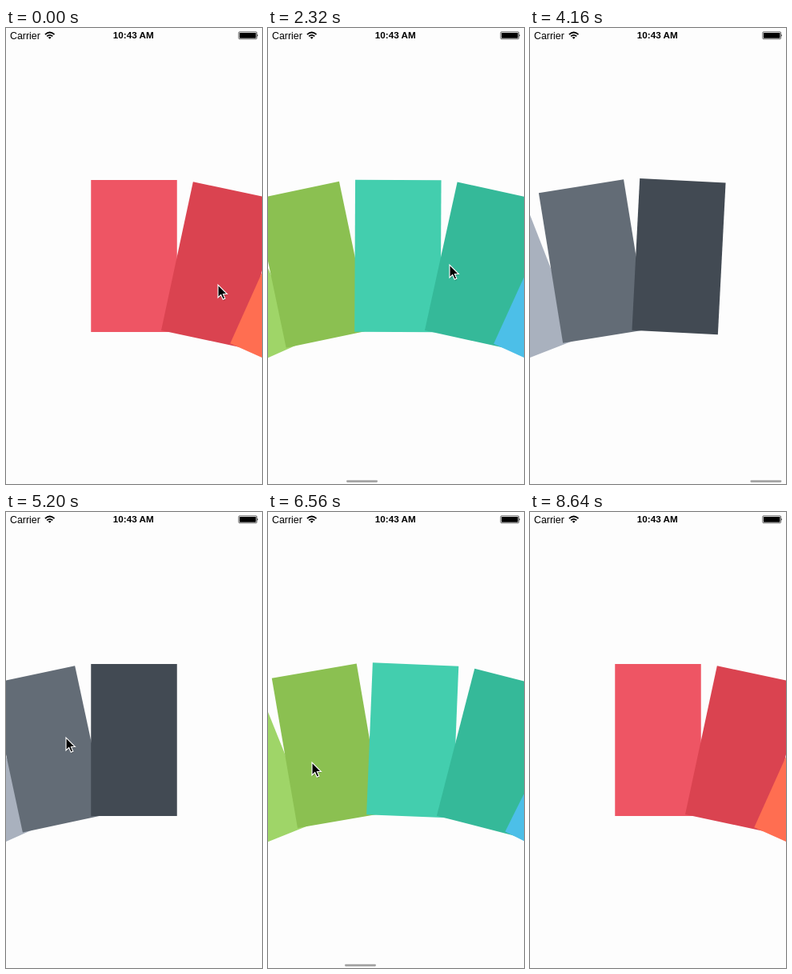
These frames come from a looping animation (320x570 px, 8720 ms). An HTML page:

```html
<!DOCTYPE html>
<html lang="en">
<head>
<meta charset="utf-8">
<title>Card wheel</title>
<style>
  html, body { margin: 0; width: 100%; height: 100%; overflow: hidden; background: #fdfdfd; }
  svg { display: block; width: 320px; height: 570px; }
  text { font-family: "Liberation Sans", Arial, sans-serif; fill: #000; }
</style>
</head>
<body>
<svg viewBox="0 0 320 570">
  <rect width="320" height="570" fill="#fdfdfd"/>
  <g id="wheel"></g>
  <rect id="bar" y="565.3" width="39" height="2.6" rx="1.3" fill="#a4a4a4"/>

  <text x="5" y="13.5" font-size="12.4">Carrier</text>
  <g fill="none" stroke="#000" stroke-width="1.7">
    <path d="M48.9 8.1Q54.7 2.9 60.5 8.1"/>
    <path d="M51.1 10.4Q54.7 7.2 58.3 10.4"/>
  </g>
  <path d="M52.7 11.7Q54.7 10.2 56.7 11.7L54.7 13.7Z"/>
  <text x="159.3" y="13.4" font-size="11.7" font-weight="700" text-anchor="middle">10:43 AM</text>
  <rect x="290.8" y="4.8" width="22.8" height="9" rx="1.3" fill="none" stroke="#000" stroke-width=".6"/>
  <rect x="291.9" y="5.9" width="20.6" height="6.8" rx=".6"/>
  <path d="M314.2 7.8Q315.8 9.3 314.2 10.8Z"/>

  <g id="cursor">
    <path d="M.8 1.6V17.6L4.5 14.1L7 19.8L9.6 18.7L7.2 13.1H12.2Z" fill="#000" opacity=".22"/>
    <path d="M0 0V16L3.7 12.5L6.2 18.2L8.8 17.1L6.4 11.5H11.4Z" fill="#000" stroke="#fff" stroke-width="1.1"/>
  </g>
</svg>
<script>
const LOOP = 8720, STEP = 80;
const CX = 160, CY = 285, RADIUS = 508, ANGLE = 12.1;
const CARD_W = 107.5, CARD_H = 190;
const DRAG = 300, DRAG_MS = 300, REST_MS = 80, FADE_MS = 300;

const COLORS = ("ee5564 da4350 ff6e51 e9573f ffce54 f7b740 9fd568 8bc051 " +
  "43ceae 35b999 4cbfe8 3bafda 5d9cec 4a89dc ab91ec 957adc " +
  "ed85c0 d76dab f5f7fa e6e9ed ccd1d9 a9b1be 636c76 424a53").split(" ");

// Each flick grabs at (x, y) and glides to card `to` in `ms`.
const FLICKS = [
  { start: 80,   ms: 2750, to: 8,  x: 265, y: 321 },
  { start: 2400, ms: 2000, to: 16, x: 227, y: 296 },
  { start: 3600, ms: 900,  to: 23, x: 212, y: 334 },
  { start: 5280, ms: 1000, to: 16, x: 75,  y: 282 },
  { start: 5960, ms: 1200, to: 7,  x: 65,  y: 300 },
  { start: 6640, ms: 800,  to: 0,  x: 55,  y: 313 }
];

const clamp = (v, lo = 0, hi = 1) => Math.min(hi, Math.max(lo, v));
const mix = (a, b, u) => a + (b - a) * u;
const glide = u => 1 - (1 - clamp(u)) ** 3.5;

// A new flick takes over from wherever the last one has got to.
let rest = 0;
for (const flick of FLICKS) {
  const next = FLICKS[FLICKS.indexOf(flick) + 1];
  const heldFor = (next ? next.start : LOOP) - flick.start;
  flick.from = rest;
  rest = mix(flick.from, flick.to, glide(heldFor / flick.ms));
}

function position(flick, time) {
  return mix(flick.from, flick.to, glide((time - flick.start) / flick.ms));
}

// Drag across the stage, then drift back to the next grab point.
function pointer(flick, next, time) {
  const dragEnd = flick.start + DRAG_MS;
  const endX = flick.x + DRAG * Math.sign(flick.from - flick.to);
  if (time < dragEnd || !next) {
    return [mix(flick.x, endX, clamp((time - flick.start) / DRAG_MS)), flick.y];
  }
  const u = clamp((time - dragEnd) / (next.start - REST_MS - dragEnd)) ** 3;
  return [mix(endX, next.x, u), mix(flick.y, next.y, u)];
}

const byId = id => document.getElementById(id);
const wheel = byId("wheel"), bar = byId("bar"), cursor = byId("cursor");

const cards = COLORS.map(color => {
  const card = document.createElementNS("http://www.w3.org/2000/svg", "rect");
  const attrs = {
    x: CX - CARD_W / 2, y: CY - CARD_H / 2,
    width: CARD_W, height: CARD_H, fill: "#" + color
  };
  for (const key in attrs) card.setAttribute(key, attrs[key]);
  return wheel.appendChild(card);
});

function draw(time) {
  const started = FLICKS.filter(f => f.start <= time).length;
  const flick = FLICKS[Math.max(0, started - 1)];
  const next = FLICKS[started];
  const pos = position(flick, time);

  cards.forEach((card, i) => {
    const turn = (i - pos) * ANGLE;
    card.setAttribute("transform", `rotate(${turn} ${CX} ${CY + RADIUS})`);
  });
  bar.setAttribute("x", 2.3 + pos * 12);
  bar.setAttribute("opacity",
    started ? clamp((flick.start + flick.ms + FADE_MS - time) / FADE_MS) : 0);
  cursor.setAttribute("transform", `translate(${pointer(flick, next, time)})`);
}

const start = performance.now();
function tick() {
  const time = (performance.now() - start) % LOOP;
  draw(Math.floor(time / STEP) * STEP);
  requestAnimationFrame(tick);
}
tick();
</script>
</body>
</html>
```
